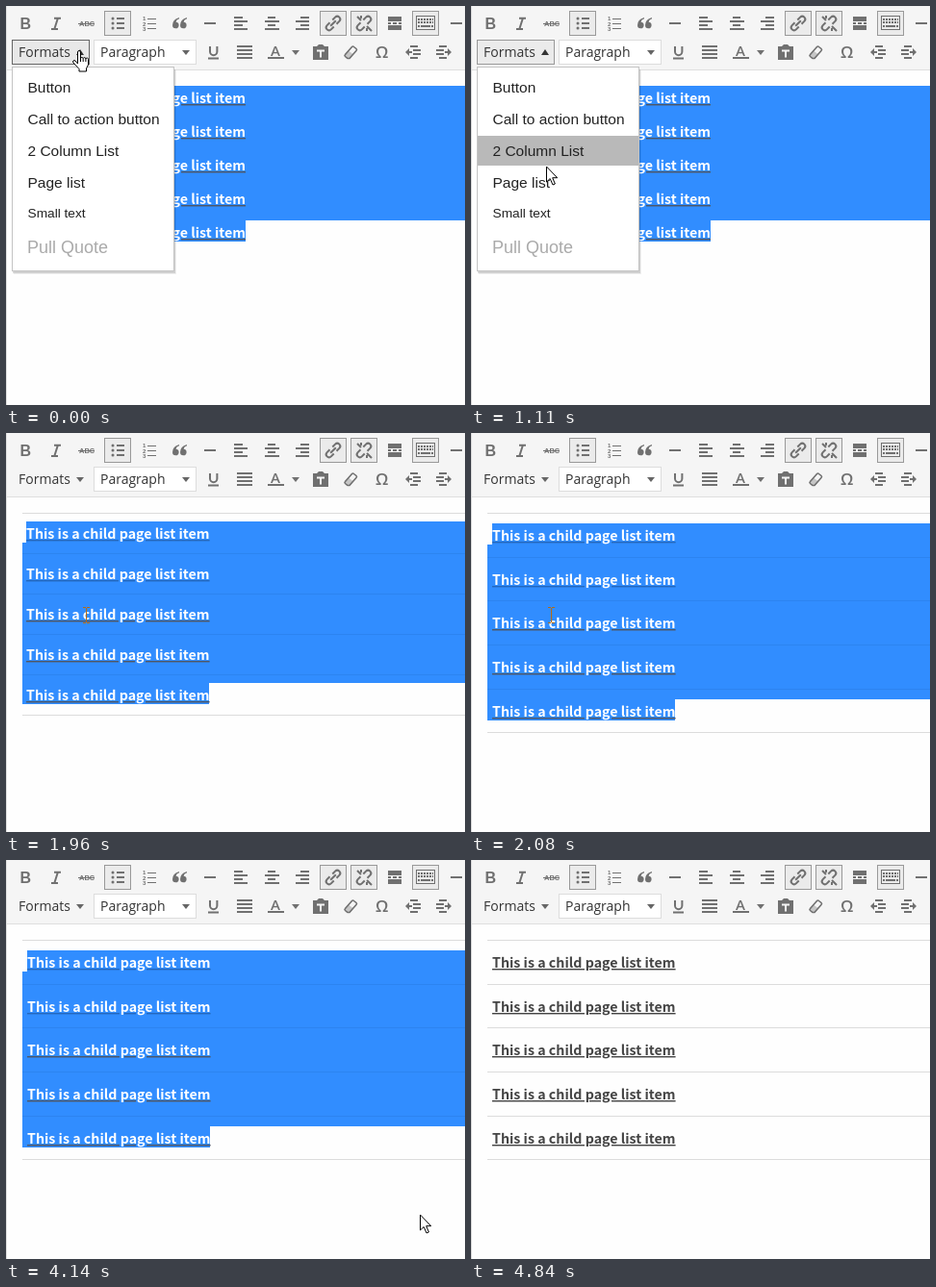
Recreate the animation shown at these times as an HTML page. Size 477 by 415 pixels, loop 5.26 s.

```html
<!DOCTYPE html>
<html lang="en">
<head>
<meta charset="utf-8">
<title>Editor formats menu</title>
<style>
  html, body { margin: 0; width: 100%; height: 100%; overflow: hidden; background: #fff; }
  svg { display: block; width: 477px; height: 415px; }
  .ui { font: 14px "Open Sans", sans-serif; fill: #333; }
  .menu text { font: 15.5px "Liberation Sans", Arial, sans-serif; fill: #222; }
  .row {
    font: bold 14.24px "Noto Sans CJK JP", "Noto Sans CJK SC", "Noto Sans CJK", sans-serif;
    text-decoration: underline; text-decoration-thickness: 1px; text-underline-offset: 2px;
  }
  .icons { fill: #707070; }
  .line { fill: none; stroke: #707070; stroke-width: 2; }
  .thin { stroke-width: 1; }
  .crisp, rect { shape-rendering: crispEdges; }
  .active { fill: #ebebeb; stroke: #999; }

  .play { animation: 5260ms step-end infinite; }
  #before, #up, .menu { animation-name: before; }
  #tight { animation-name: tight; }
  #spaced { animation-name: spaced; }
  #plain { animation-name: plain; }
  #hover { animation-name: hover; }
  #opened { animation-name: opened; }
  #closed { animation-name: closed; }
  #mark { animation-name: mark; }
  #caret { animation-name: caret; }
  #arrow { animation-name: arrow; }
  #hand { animation-name: hand; }
  #beam { animation-name: beam; }

  @keyframes before { 0% { visibility: visible } 37.26%, 100% { visibility: hidden } }
  @keyframes tight { 0% { visibility: hidden } 37.26% { visibility: visible } 39.54%, 100% { visibility: hidden } }
  @keyframes spaced { 0% { visibility: hidden } 39.54% { visibility: visible } 81.55%, 100% { visibility: hidden } }
  @keyframes plain { 0% { visibility: hidden } 81.55%, 100% { visibility: visible } }
  @keyframes hover { 0% { visibility: visible } 18.82%, 100% { visibility: hidden } }
  @keyframes opened { 0% { visibility: hidden } 18.82% { visibility: visible } 37.26%, 100% { visibility: hidden } }
  @keyframes closed { 0% { visibility: hidden } 37.26%, 100% { visibility: visible } }
  @keyframes caret { 0% { visibility: hidden } 81.55% { visibility: visible } 92.01%, 100% { visibility: hidden } }
  @keyframes mark {
    0% { visibility: hidden; transform: translateY(102px) }
    18.82% { visibility: visible; transform: translateY(102px) }
    21.1% { visibility: visible; transform: translateY(135px) }
    23.95% { visibility: visible; transform: translateY(168px) }
    37.26%, 100% { visibility: hidden; transform: translateY(168px) }
  }
  @keyframes arrow {
    0% { visibility: hidden; transform: translate(75px, 49px) }
    15.96% { visibility: visible; transform: translate(75px, 49px) }
    18.82% { visibility: visible; transform: translate(77px, 115px) }
    21.1% { visibility: visible; transform: translate(78px, 166px) }
    23.95% { visibility: hidden; transform: translate(78px, 166px) }
    65.87% { visibility: visible; transform: translate(359px, 341px) }
    68.25% { visibility: hidden; transform: translate(359px, 341px) }
    75.85% { visibility: visible; transform: translate(439px, 381px) }
    78.7% { visibility: visible; transform: translate(430px, 368px) }
    84.41% { visibility: visible; transform: translate(442px, 394px) }
    87.26%, 100% { visibility: hidden; transform: translate(442px, 394px) }
  }
  @keyframes hand {
    0% { visibility: visible; transform: translate(69px, 46px) }
    15.96% { visibility: hidden; transform: translate(69px, 46px) }
    23.95% { visibility: visible; transform: translate(77px, 189px) }
    29.08% { visibility: visible; transform: translate(77px, 188px) }
    37.26%, 100% { visibility: hidden; transform: translate(77px, 188px) }
  }
  @keyframes beam {
    0% { visibility: hidden; transform: translate(80px, 181px) }
    37.26% { visibility: visible; transform: translate(80px, 181px) }
    60.83% { visibility: visible; transform: translate(91px, 181px) }
    63.49% { visibility: visible; transform: translate(217px, 250px) }
    65.87%, 100% { visibility: hidden; transform: translate(217px, 250px) }
  }
</style>
</head>
<body>
<svg viewBox="0 0 477 415">
  <defs>
    <path id="down" d="M0 0h8l-4 5z"/>
    <path id="ring" d="M-2 -3H-6a3 3 0 0 0 0 6H-2M2 -3H6a3 3 0 0 1 0 6H2"/>
    <g id="indent">
      <path class="line crisp" d="M5 0h8M8 4h8M8 8h8M5 12h8"/>
      <path d="M0 6l4-4v3h3v2h-3v3z"/>
    </g>
  </defs>
  <rect width="477" height="415" fill="#fefefe"/>
  <rect width="477" height="66" fill="#f5f5f5"/>
  <rect y="66" width="477" height="1" fill="#dedede"/>
  <rect width="1" height="415" fill="#e0e0e0"/>

  <path class="active crisp" d="M102.5 5.5h27v25h-27zM326.5 5.5h27v25h-27zM358.5 5.5h27v25h-27zM422.5 5.5h27v25h-27z"/>

  <g class="icons">
    <text x="14.5" y="24" font-family="Liberation Sans, sans-serif" font-weight="bold" font-size="16">B</text>
    <path class="line" d="M50 12.8h7M47 24h7M53.8 13l-3.5 11"/>
    <text x="76" y="21" font-family="Liberation Sans, sans-serif" font-weight="bold" font-size="7.5">ABC</text>
    <path class="line thin crisp" d="M75 18.5h17"/>
    <circle cx="111" cy="13" r="1.5"/><circle cx="111" cy="18" r="1.5"/><circle cx="111" cy="23" r="1.5"/>
    <path class="line crisp" d="M115 13h8m-8 5h8m-8 5h8"/>
    <g font-family="Liberation Sans, sans-serif" font-size="6" font-weight="bold">
      <text x="142" y="15">1</text><text x="142" y="20.5">2</text><text x="142" y="26">3</text>
    </g>
    <path class="line thin crisp" d="M147 13h9m-9 5h9m-9 5h9"/>
    <path d="M180 12q-7 2-7 8a3.3 3.3 0 1 0 3.6-3.3q.2-2.4 3.4-3.4zm8 0q-7 2-7 8a3.3 3.3 0 1 0 3.6-3.3q.2-2.4 3.4-3.4z"/>
    <path class="line crisp" d="M206 18h12M462 18h12"/>
    <path class="line crisp" d="M237 12h9m-9 4h14m-14 4h9m-9 4h14M272 12h8m-11 4h15m-12 4h8m-11 4h15M306 12h9m-14 4h14m-9 4h9m-14 4h14"/>
    <g transform="translate(340 18) rotate(-45)">
      <use href="#ring" class="line"/><path class="line" d="M-4 0h8"/>
    </g>
    <g transform="translate(372 18)">
      <use href="#ring" class="line" transform="rotate(-45)"/>
      <path class="line" d="M-7 -7l4 4M3 3l5 5M-3 -8v3M3 8v-3"/>
    </g>
    <path class="crisp" d="M397 11h14v5h-14zM397 20h14v5h-14zM397 17h3v2h-3zM402 17h4v2h-4zM408 17h3v2h-3z"/>
    <path class="line thin crisp" d="M426.5 10.5h19v14h-19z"/>
    <path class="line crisp" d="M428 14h16m-16 3h16" stroke-dasharray="2 1"/>
    <path class="line crisp" d="M428 21h2m1 0h10m1 0h2"/>

    <path class="line" d="M212 42v5.500a3.700 3.700 0 0 0 7.400 0V42M210 54.500h11"/>
    <path class="line crisp" d="M240 42h16m-16 4h16m-16 4h16m-16 4h16"/>
    <text x="275" y="52" font-family="Open Sans, sans-serif" font-weight="600" font-size="15">A</text>
    <path class="line crisp" d="M272 54h17"/>
    <use href="#down" x="297" y="46"/>
    <path d="M319 42h4l2-2h4l2 2h4v14h-16z"/>
    <path d="M323 46.500h8m-4 0v7" fill="none" stroke="#f5f5f5" stroke-width="2"/>
    <path class="line" d="M352.500 50.500l7-8q1-1 2 0l2.500 2q1 1 0 2l-7 8h-2l-2.500-2q-1-1 0-2z" style="stroke-width:1.6"/>
    <path d="M352 50.500l4-4 5 4-4 4.500h-3z" opacity=".35"/>
    <text x="384" y="54" font-family="Open Sans, sans-serif" font-weight="600" font-size="17">Ω</text>
    <use href="#indent" x="415" y="42"/>
    <use href="#indent" transform="translate(463 42) scale(-1 1)"/>
  </g>

  <g class="ui">
    <path id="hover" class="play crisp" d="M6.500 35.500h80v25h-80z" fill="#e8e8e8" stroke="#666"/>
    <path id="opened" class="play crisp" d="M6.500 35.500h80v25h-80z" fill="#ebebeb" stroke="#999"/>
    <path id="up" class="play" d="M73 51h8l-4-6z"/>
    <use id="closed" class="play" href="#down" x="73" y="46" fill="#666"/>
    <text x="13" y="53">Formats</text>
    <path class="crisp" d="M91.500 35.500h106v25h-106z" fill="#fff" stroke="#ddd"/>
    <text x="98" y="53">Paragraph</text>
    <use href="#down" x="183" y="46" fill="#666"/>
  </g>

  <g id="before" class="play"></g>
  <g id="tight" class="play"></g>
  <g id="spaced" class="play"></g>
  <g id="plain" class="play"></g>
  <rect id="caret" class="play" x="212" y="276" width="1" height="22" fill="#222"/>

  <g class="menu play">
    <rect x="8" y="67" width="169" height="212" fill="#000" opacity=".06"/>
    <rect x="7" y="66" width="169" height="212" fill="#000" opacity=".13"/>
    <path class="crisp" d="M6.500 63.500h168v212h-168z" fill="#fff" stroke="#c4c4c4"/>
    <rect id="mark" class="play" x="7" width="167" height="31" fill="#b9b9b9"/>
    <text x="22.500" y="90">Button</text>
    <text x="22.500" y="123">Call to action button</text>
    <text x="22.500" y="156">2 Column List</text>
    <text x="22.500" y="189">Page list</text>
    <text x="22.500" y="220" style="font-size:13.7px">Small text</text>
    <text x="22" y="257" style="font-size:18px;fill:#aaa">Pull Quote</text>
  </g>

  <path id="beam" class="play crisp" d="M0 .5h3m1 0h3M3.500 1v15M0 16.500h3m1 0h3" fill="none" stroke="#b86a10"/>
  <path id="arrow" class="play" d="M.5 1v16l3.700-3.500 2.800 6.500 2.400-1-2.700-6.300h5z" fill="#fff" stroke="#000"/>
  <g id="hand" class="play">
    <path d="M5.500 14V2a1.500 1.500 0 0 1 3 0V8.500a1.400 1.400 0 0 1 2.700 0a1.400 1.400 0 0 1 2.700.6a1.300 1.300 0 0 1 2.600.6V15l-2 4v3H7V19.500L1 13a1.400 1.400 0 0 1 2-2z" fill="#fff" stroke="#000"/>
    <path d="M8.500 8v4M11.200 8.500V12M13.900 9v3" stroke="#000"/>
  </g>
</svg>
<script>
  const BLUE = '#318dff', SEAM = '#2c84f0', RULE = '#dcdcdc', DARK = '#454545', SHADE = '#2468bd', GREY = '#4f5766';

  const rect = (x, y, w, h, fill) =>
    `<rect x="${x}" y="${y}" width="${w}" height="${h}" fill="${fill}"/>`;

  const row = (x, y, ink, line, anchor = 'start') =>
    `<text class="row" x="${x}" y="${y}" text-anchor="${anchor}" fill="${line}"><tspan fill="${ink}">This is a child page list item</tspan></text>`;

  const rows = draw => [0, 1, 2, 3, 4].map(draw).join('');

  // Ruled list; a selection covers the first line from its text, the last up to its end.
  function ruledList(id, { x, top, pitch, selected }) {
    const ruleY = i => Math.round(83 + pitch * i - .1);
    const last = Math.round(top + pitch * 4);
    const selection = selected
      ? rect(x, top, 477 - x, 22, BLUE) + rect(17, top + 22, 460, last - top - 22, BLUE)
        + rect(17, last, x + 173, 22, BLUE)
      : '';
    const rules = [0, 1, 2, 3, 4, 5].map(i =>
      rect(17, ruleY(i), 460, 1, selected && i % 5 ? SEAM : RULE)).join('');
    const underline = i => !selected ? DARK : i < 2 ? SHADE : GREY;
    document.getElementById(id).innerHTML = selection + rules + rows(i =>
      row(x, Math.round(top + 18 + pitch * i), selected ? '#fff' : DARK, underline(i)));
  }

  document.getElementById('before').innerHTML =
    rect(17, 83, 460, 140, BLUE) + rect(17, 223, 232, 22, BLUE)
    + rows(i => row(249, 101 + 35 * i, '#fff', GREY, 'end'));
  ruledList('tight', { x: 21, top: 92, pitch: 42, selected: true });
  ruledList('spaced', { x: 22, top: 94, pitch: 45.7, selected: true });
  ruledList('plain', { x: 22, top: 94, pitch: 45.7, selected: false });
</script>
</body>
</html>
```
